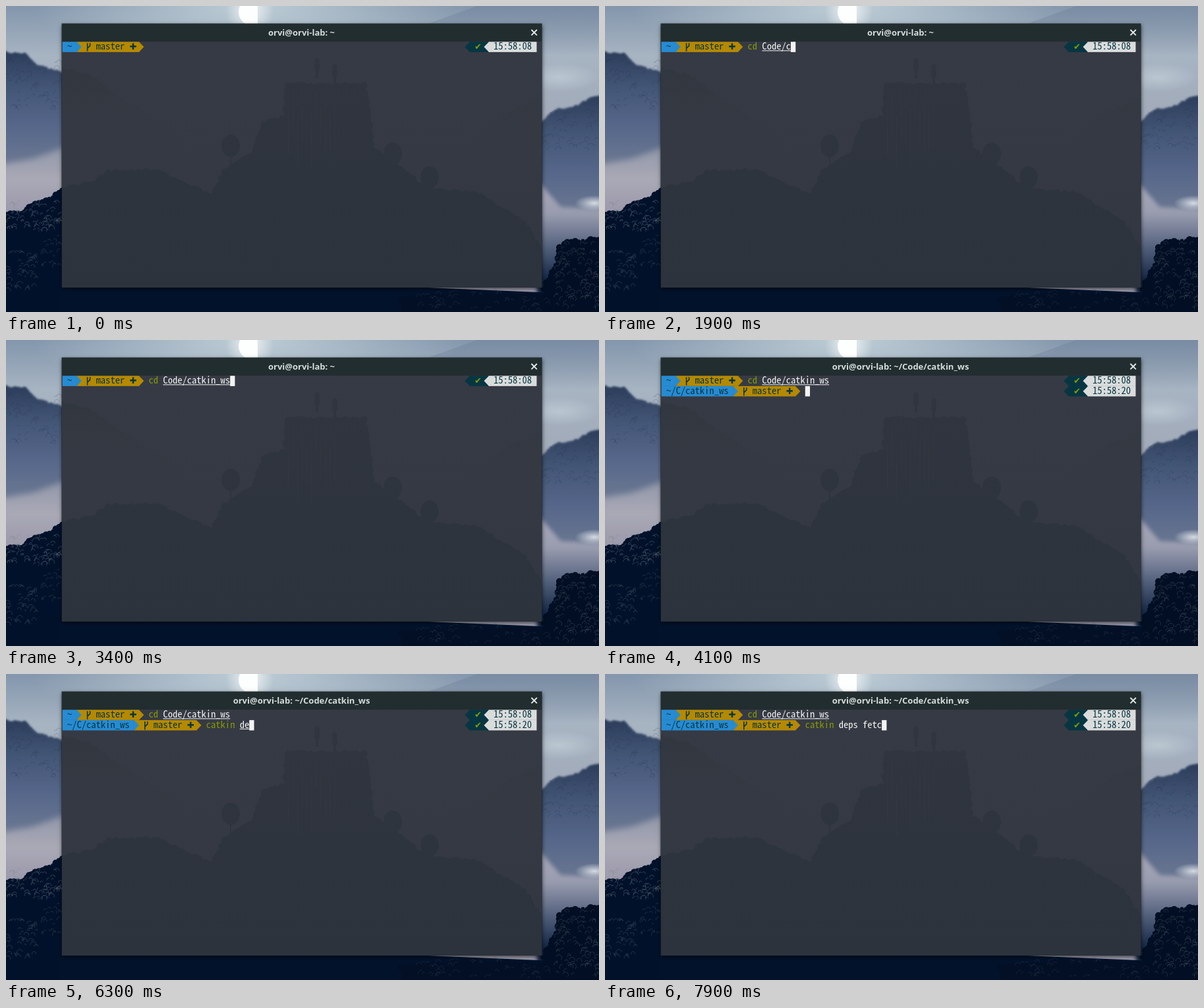
Write an HTML page with a canvas that moves like this. It is 900 px wide and 464 px high and loops after 8 s.

```html
<!DOCTYPE html>
<html lang="en">
<head>
<meta charset="utf-8">
<title>Terminal session</title>
<style>
  html, body { margin: 0; width: 100%; height: 100%; overflow: hidden; background: #02122b; }
  canvas { position: absolute; left: 0; top: 0; }
</style>
</head>
<body>
<canvas id="desktop" width="900" height="464"></canvas>
<canvas id="terminal" width="900" height="464"></canvas>
<script>
const bg = document.getElementById('desktop').getContext('2d');
const term = document.getElementById('terminal').getContext('2d');

let seed = 7;
const random = () => (seed = (seed * 16807) % 2147483647) / 2147483647;

// ---------- desktop ----------

// Vertical gradient with evenly spaced colors.
function fade(y0, y1, ...colors) {
  const g = bg.createLinearGradient(0, y0, 0, y1);
  colors.forEach((color, i) => g.addColorStop(i / (colors.length - 1), color));
  return g;
}

function ellipse(x, y, rx, ry, fill) {
  bg.fillStyle = fill;
  bg.beginPath();
  bg.ellipse(x, y, rx, ry, 0, 0, 7);
  bg.fill();
}

function glow(x, y, rx, ry, rgb, alpha) {
  bg.save();
  bg.translate(x, y);
  bg.scale(rx, ry);
  const g = bg.createRadialGradient(0, 0, 0, 0, 0, 1);
  g.addColorStop(0, `rgba(${rgb},${alpha})`);
  g.addColorStop(1, `rgba(${rgb},0)`);
  ellipse(0, 0, 1, 1, g);
  bg.restore();
}

// Everything below a ridge line; `leaf` is the size of the foliage bumps on it.
function land(ridge, fill, leaf = 0) {
  const path = new Path2D();
  path.moveTo(ridge[0][0], 470);
  ridge.forEach(([x, y]) => path.lineTo(x, y));
  path.lineTo(ridge.at(-1)[0], 470);
  path.closePath();
  for (let i = 1; leaf && i < ridge.length; i++) {
    const [ax, ay] = ridge[i - 1], [bx, by] = ridge[i];
    const count = Math.ceil(Math.hypot(bx - ax, by - ay) / leaf);
    for (let k = 0; k < count; k++) {
      const bump = new Path2D();
      bump.arc(ax + (bx - ax) * k / count, ay + (by - ay) * k / count, leaf * (.4 + random() * .6), 0, 7);
      path.addPath(bump);
    }
  }
  bg.fillStyle = fill;
  bg.fill(path);
}

function leaves(x, y, w, h, count, color) {
  bg.strokeStyle = color;
  bg.lineWidth = .7;
  for (let i = 0; i < count; i++) {
    const start = 2.6 + random();
    bg.beginPath();
    bg.arc(x + random() * w, y + random() * h, 1.5 + random() * 3, start, start + 2 + random() * 2);
    bg.stroke();
  }
}

function drawDesktop() {
  bg.fillStyle = fade(0, 300, '#8396ac', '#a7b4c2', '#a2acbb', '#a7a9b8', '#a09fb0');
  bg.fillRect(0, 0, 900, 464);
  glow(370, 0, 330, 90, '205,220,225', .8);
  land([[640, 27], [715, 0], [900, 0]], fade(0, 75, 'rgba(112,130,154,.5)', 'rgba(112,130,154,0)'));
  glow(840, 108, 60, 22, '195,208,216', .7);

  glow(370, 8, 36, 40, '255,255,255', .8);
  bg.save();
  bg.beginPath();
  bg.rect(340, 0, 42, 30);
  bg.clip();
  ellipse(374, 9, 21, 21, '#fdfefe');
  bg.restore();

  // Far hills sink into mist.
  bg.filter = 'blur(1.5px)';
  const hill = (top, bottom) => fade(top, bottom, '#2c3d5b', '#445676', '#55668a', '#6a7791');
  land([[-5, 73], [28, 75], [42, 90], [90, 106]], hill(70, 235), 5);
  land([[808, 185], [835, 160], [870, 154], [884, 143], [905, 137]], hill(135, 310), 5);
  bg.filter = 'blur(5px)';
  land([[-9, 240], [40, 232], [95, 212]], fade(212, 315, '#8f96a8', '#aaa9b6', '#9a98aa'));
  bg.filter = 'blur(3px)';
  land([[806, 264], [842, 305], [910, 308]], fade(264, 464, '#a9aaba', '#9a9db0', '#56637f', '#152847', '#061832'));
  bg.filter = 'none';
  glow(893, 299, 30, 12, '226,230,235', .9);
  leaves(0, 84, 84, 75, 50, 'rgba(25,40,67,.3)');
  leaves(816, 160, 84, 60, 50, 'rgba(25,40,67,.3)');

  // Near forest.
  land([[-5, 316], [24, 315], [39, 302], [61, 296], [90, 277]], '#01112a', 6);
  land([[80, 427], [640, 427], [905, 438]], '#02122b');
  land([[600, 445], [690, 438], [905, 440]], '#030f25', 6);
  land([[815, 430], [837, 388], [840, 366], [852, 359], [905, 353]], '#020e23', 6);
  leaves(2, 296, 82, 45, 75, 'rgba(126,137,145,.55)');
  leaves(2, 372, 45, 62, 45, 'rgba(98,111,125,.5)');
  leaves(50, 340, 34, 55, 24, 'rgba(98,111,125,.4)');
  leaves(835, 360, 65, 100, 110, 'rgba(99,111,123,.45)');
  leaves(625, 432, 200, 30, 55, 'rgba(75,90,109,.35)');
}

// Dim view of the landscape behind the translucent terminal.
function drawWindow() {
  bg.save();
  bg.shadowColor = 'rgba(0,0,0,.6)';
  bg.shadowBlur = 6;
  bg.shadowOffsetY = 2;
  bg.fillStyle = '#1d2629';
  bg.fillRect(84.5, 26.5, 729, 400.5);
  bg.restore();

  bg.save();
  bg.beginPath();
  bg.rect(85, 54, 728, 372.5);
  bg.clip();
  bg.fillStyle = fade(54, 427, '#363a44', '#353943', '#30363f');
  bg.fillRect(85, 54, 728, 373);
  const haze = fade(90, 240, '#31373f', 'rgba(53,57,66,0)');
  land([[80, 95], [125, 108], [190, 152], [265, 202]], haze, 6);
  land([[700, 215], [770, 160], [820, 140]], haze, 6);

  const dark = fade(80, 427, '#30353f', '#2e343d', '#2c333d');
  land([[80, 280], [135, 269], [155, 252], [230, 252], [313, 290], [332, 252], [376, 224], [392, 180],
    [424, 168], [428, 121], [543, 121], [556, 216], [640, 280], [715, 286], [785, 330], [820, 385]], dark, 6);
  for (const [x, y] of [[341, 212], [587, 224], [643, 260]]) {
    ellipse(x, y, 14, 17, dark);
    bg.fillRect(x - 1, y, 2, 34);
  }
  for (const [x, y] of [[472, 84], [499, 93]]) {
    ellipse(x, y, 4, 5, dark);
    bg.fillRect(x - 4, y + 4, 8, 10);
    bg.fillRect(x - 2, y + 12, 4, 14);
  }
  bg.fillStyle = 'rgba(57,61,70,.3)';
  for (let x = 428; x < 500; x += 7) bg.fillRect(x, 130 + random() * 40, 1.5, 40 + random() * 50);
  bg.restore();

  bg.fillStyle = '#222d2f';
  bg.fillRect(85, 27, 728, 27);
  bg.strokeStyle = '#e4e9e8';
  bg.lineWidth = 1.9;
  bg.beginPath();
  for (const d of [-4.2, 4.2]) {
    bg.moveTo(801.6 - d, 36);
    bg.lineTo(801.6 + d, 44.4);
  }
  bg.stroke();
}

// ---------- terminal ----------

const LEFT = 85.7, TOP = 54.3, CELL = 7.27, LINE = 15.6;
const BLUE = '#268bd2', YELLOW = '#b58900', GREEN = '#859900', RED = '#dc322f';
const INK = '#073642', PAPER = '#dadcdc', WHITE = '#f3f4f2';
const KNOWN = ['cd', 'cat', 'catkin'];

// Keystrokes by time; the cursor is off during `blink`.
const lines = [
  {
    start: 0, blink: [0, 200], path: '~', clock: '15:58:08', title: '~',
    keys: { 500: 'c', 700: 'd ', 1300: 'Co', 1500: 'de', 1900: '/c', 2100: 'at', 2400: 'k', 2600: 'in', 3300: '_w', 3400: 's' },
  },
  {
    start: 4100, blink: [4600, 5000], path: '~/C/catkin_ws', clock: '15:58:20', title: '~/Code/catkin_ws',
    keys: { 5000: 'c', 5300: 'at', 5600: 'ki', 5800: 'n ', 6300: 'de', 6500: 'p', 6800: 's', 6900: ' ', 7500: 'fe', 7900: 'tc' },
  },
];

// Pick the type size whose advance fills one cell.
const MONO = '"Noto Sans Mono CJK JP", "Noto Sans Mono CJK SC", "Noto Sans Mono", monospace';
term.font = '100px ' + MONO;
const monoFont = `${100 * CELL / term.measureText('0').width}px ${MONO}`;

const colX = col => LEFT + col * CELL;
const rowY = row => TOP + row * LINE;

function cells(row, col, count, color) {
  term.fillStyle = color;
  term.fillRect(colX(col), rowY(row), count * CELL, LINE);
}

function arrow(row, col, color, dir) {
  const base = colX(dir > 0 ? col : col + 1), y = rowY(row);
  term.fillStyle = color;
  term.beginPath();
  term.moveTo(base - dir * .3, y);
  term.lineTo(base + dir * CELL, y + LINE / 2);
  term.lineTo(base - dir * .3, y + LINE);
  term.fill();
}

function write(row, col, text, color, font = monoFont) {
  term.font = font;
  term.textAlign = 'left';
  term.fillStyle = color;
  term.fillText(text, colX(col), rowY(row) + 12);
}

const symbol = (row, col, ch, color) => write(row, col, ch, color, '13px "DejaVu Sans", sans-serif');

function branch(row, col) {
  const x = colX(col), y = rowY(row);
  term.strokeStyle = INK;
  term.lineWidth = 1.6;
  term.beginPath();
  term.moveTo(x + 1.5, y + 2);
  term.lineTo(x + 1.5, y + 14.5);
  term.moveTo(x + 5.5, y + 2);
  term.lineTo(x + 5.5, y + 6);
  term.lineTo(x + 1.5, y + 10);
  term.stroke();
}

// Draws both prompt ends and returns the column where typing starts.
function prompt(row, { path, clock }) {
  const end = path.length + 2;
  cells(row, end, 13, YELLOW);
  cells(row, 0, end, BLUE);
  arrow(row, end, BLUE, 1);
  arrow(row, end + 13, YELLOW, 1);
  write(row, 1, path, INK);
  branch(row, end + 2);
  write(row, end + 4, 'master', INK);
  symbol(row, end + 11, '✚', INK);

  cells(row, 85, 4, INK);
  arrow(row, 84, INK, -1);
  cells(row, 89, 10, PAPER);
  arrow(row, 88, PAPER, -1);
  symbol(row, 86, '✔', GREEN);
  write(row, 90, clock, INK);
  return end + 15;
}

function command(row, col, text) {
  const name = text.split(' ')[0], arg = text.slice(name.length + 1);
  const argCol = col + name.length + 1;
  if (KNOWN.includes(name)) write(row, col, name, GREEN);
  else write(row, col, name, RED, 'bold ' + monoFont);
  write(row, argCol, arg, WHITE);
  // Arguments that begin an existing path are underlined.
  if (name === 'cd' || arg === 'de') {
    term.fillRect(colX(argCol), rowY(row) + 13, arg.length * CELL, 1);
  }
}

function drawTerminal(t) {
  const open = lines.filter(line => line.start <= t);
  const current = open.at(-1);
  term.clearRect(0, 0, 900, 464);
  term.font = 'bold 13px "Noto Sans", "Open Sans", sans-serif';
  term.textAlign = 'center';
  term.fillStyle = '#d5dcda';
  term.fillText('orvi@orvi-lab: ' + current.title, 448.5, 45);

  open.forEach((line, row) => {
    const col = prompt(row, line);
    const text = Object.entries(line.keys).filter(([at]) => at <= t).map(([, keys]) => keys).join('');
    command(row, col, text);
    const [off, on] = line.blink;
    if (line === current && (t < off || t >= on)) cells(row, col + text.length, 1, WHITE);
  });
}

function tick(now) {
  drawTerminal(now % 8000);
  requestAnimationFrame(tick);
}

drawDesktop();
drawWindow();
tick(performance.now());
</script>
</body>
</html>
```
